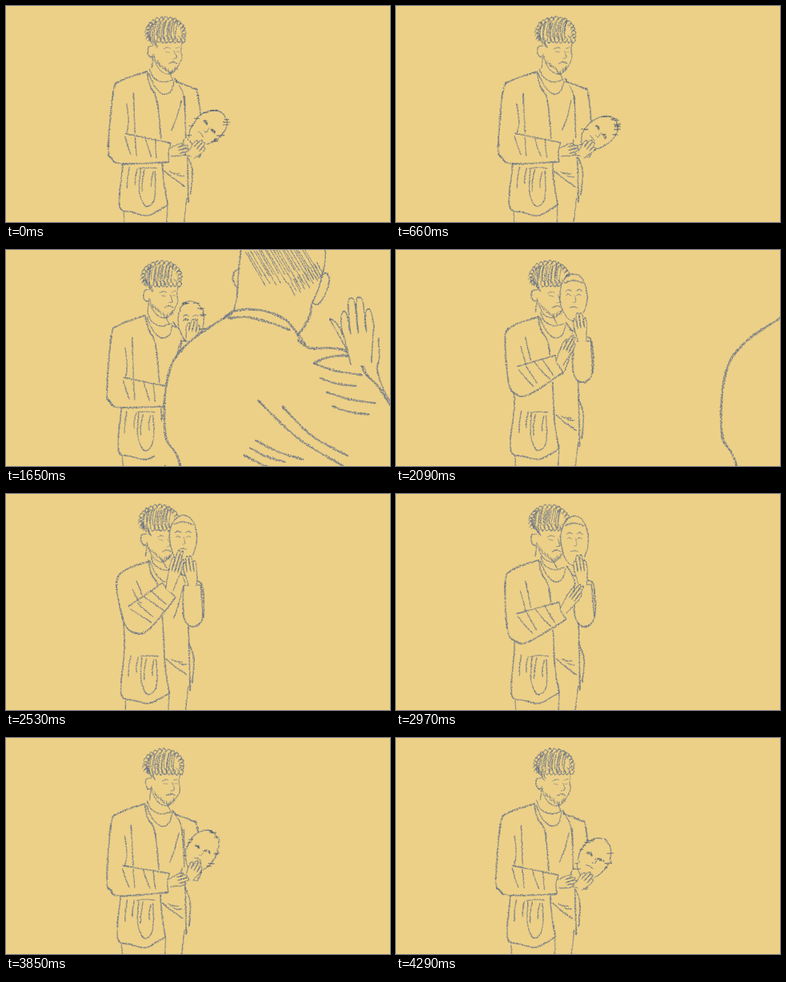
Recreate the animation shown at these times as an HTML page with a canvas. Size 480 px wide and 270 px high, loop 4.4 s.

```html
<!DOCTYPE html>
<html lang="en">
<head>
<meta charset="utf-8">
<title>Pencil sketch loop</title>
<style>
html, body { margin: 0; width: 100%; height: 100%; overflow: hidden; background: #ecd088; }
canvas { display: block; width: 100vw; height: 100vh; }
</style>
</head>
<body>
<canvas id="c" width="480" height="270"></canvas>
<script>
const ctx = document.getElementById('c').getContext('2d');
const PAPER = '#ecd088', PENCIL = '#66728a', INK = '#3c4f74';
const STEP = 110, COUNT = 40;

// Arm poses: shoulder, elbow, wrist, fingertip
const leftLow = [152, 108, 147, 178, 205, 183, 228, 177];
const leftPray = [156, 110, 166, 155, 204, 120, 219, 70];
const leftMid = [153, 108, 150, 179, 213, 172, 246, 158];
const rightLow = [228, 112, 234, 168, 231, 187, 247, 169];
const rightUp = [226, 112, 232, 150, 232, 114, 238, 87];
const rightPray = [234, 118, 234, 154, 233, 114, 228, 77];
const rightChin = [238, 118, 238, 153, 234, 114, 229, 74];

// Tracks: [frame, values...], eased between entries
const leftTrack = [[0, ...leftLow], [16, ...leftLow], [21, ...leftPray], [25, ...leftPray],
  [29, ...leftMid], [32, ...leftMid], [36, ...leftLow]];
const rightTrack = [[0, ...rightLow], [11, ...rightLow], [15, ...rightUp], [20, ...rightPray],
  [25, ...rightPray], [29, ...rightChin], [32, ...rightChin], [36, ...rightLow]];
// Mask: centre, radii, tilt, glitch
const maskTrack = [[0, 252, 153, 18, 27, .85, 1], [6, 254, 159, 17, 26, .9, 1], [10, 246, 155, 18, 22, .5, 1],
  [15, 233, 90, 16, 26, 0, .6], [20, 221, 56, 17, 30, 0, 0], [31, 224, 60, 17, 32, 0, 0], [36, 250, 151, 19, 27, .5, 1]];
// Offsets: whole man, torso, head
const shiftTrack = [[0, 0, 0, 0], [6, 0, 0, 0], [10, -3, 0, -1], [15, -2, 0, -3],
  [20, 0, 2, -8], [26, 0, 2, -8], [31, 0, 1, -7], [36, -3, 0, 1]];

let seed = 1, slice = () => 0;
function rnd() {
  seed = seed + 0x6D2B79F5 | 0;
  let t = Math.imul(seed ^ seed >>> 15, 1 | seed);
  t = t + Math.imul(t ^ t >>> 7, 61 | t) ^ t;
  return ((t ^ t >>> 14) >>> 0) / 4294967296;
}
const lerp = (a, b, u) => a + (b - a) * u;

function values(keys, k) {
  let i = 0;
  while (i < keys.length - 2 && keys[i + 1][0] <= k) i++;
  const a = keys[i], b = keys[i + 1];
  const u = Math.min(1, (k - a[0]) / (b[0] - a[0])), e = u * u * (3 - 2 * u);
  return a.slice(1).map((v, j) => lerp(v, b[j + 1], e));
}

// Catmull-Rom samples about `gap` pixels apart
function curve(p, gap) {
  const out = [], n = p.length / 2;
  const at = (i, d) => p[Math.max(0, Math.min(n - 1, i)) * 2 + d];
  const spline = (i, d, t) => {
    const a = at(i - 1, d), b = at(i, d), c = at(i + 1, d), e = at(i + 2, d);
    return b + t / 2 * (c - a + t * (2 * a - 5 * b + 4 * c - e + t * (3 * (b - c) + e - a)));
  };
  for (let i = 0; i < n - 1; i++) {
    const m = Math.ceil(Math.hypot(at(i + 1, 0) - at(i, 0), at(i + 1, 1) - at(i, 1)) / gap) || 1;
    for (let j = 0; j < m; j++) out.push([spline(i, 0, j / m), spline(i, 1, j / m)]);
  }
  return out;
}

// Grainy pencil line with tapered ends and uneven pressure
function stroke(p, w = 2, color = PENCIL) {
  const pts = curve(p.map(v => v + (rnd() - .5) * .8), .6 / w);
  const phase = rnd() * 6, taper = 9 * w;
  ctx.fillStyle = color;
  pts.forEach(([x, y], i) => {
    const end = Math.min(1, .35 + Math.min(i, pts.length - i) / taper);
    const press = end * (.85 + .15 * Math.sin(i * .1 / w + phase));
    const size = .65 + rnd() * .5;
    ctx.globalAlpha = press * (.35 + rnd() * .6);
    ctx.fillRect(x + slice(y) + (rnd() - .5) * w * press - size / 2,
      y + (rnd() - .5) * w * press - size / 2, size, size);
  });
  ctx.globalAlpha = 1;
}

// Strokes as "x y x y ..." parted by slashes
const sketch = (w, s) => s.split('/').forEach(p => stroke(p.trim().split(/\s+/).map(Number), w));

function blank(p) {
  ctx.beginPath();
  curve(p.concat(p.slice(0, 2)), 2).forEach(q => ctx.lineTo(q[0], q[1]));
  ctx.fillStyle = PAPER;
  ctx.fill();
}

// n lines starting along one segment, all running (dx, dy) with a bend
function lines(x0, y0, x1, y1, n, dx, dy, w, bend = 1, rough = 2) {
  for (let i = 0; i < n; i++) {
    const u = n > 1 ? i / (n - 1) : 0, l = 1 - .25 * (i % 2) - rnd() * .03 * rough;
    const x = lerp(x0, x1, u) + rnd() * rough, y = lerp(y0, y1, u) + rnd() * rough;
    stroke([x, y, x + dx * l / 2 - bend, y + dy * l / 2 + bend, x + dx * l, y + dy * l], w);
  }
}
function shifted(dx, fn) {
  ctx.save();
  ctx.translate(dx, 0);
  fn();
  ctx.restore();
}

// Sleeve built from its joints; side is 1 for the screen-left arm, -1 for the other
function sleeve([sx, sy, ex, ey, wx, wy], [r0, r1, r2], side) {
  const normal = (dx, dy) => {
    const l = Math.hypot(dx, dy) || 1;
    return [-dy / l * side, dx / l * side];
  };
  const off = (x, y, n, r) => [x + n[0] * r, y + n[1] * r];
  const n1 = normal(ex - sx, ey - sy), n2 = normal(wx - ex, wy - ey);
  const sum = [n1[0] + n2[0], n1[1] + n2[1]], len = Math.hypot(...sum);
  const mid = len > .4 ? sum.map(v => v / len) : [0, 1];
  const top = [...off(sx, sy, [side * 1.35, -1.45], r0), ...off(sx, sy, [-.45 * side, -.8], r0),
    ...off(sx, sy, n1, r0), ...off(ex, ey, n1, r1)];
  const seam = [...off(ex, ey, n1, -.8 * r1), ...off(sx, sy, n1, -.4 * r0)];
  const under = [...off(ex, ey, mid, r1), ...off(ex, ey, n2, r1), ...off(wx, wy, n2, r2)];
  const inner = [...off(wx, wy, n2, -r2), ...off(ex, ey, n2, -r1)];
  blank(top.concat(seam));
  stroke(seam, 1.7);
  blank(top.slice(6).concat(under, inner));
  stroke(top.concat(under), 2.3);
  stroke(inner, 1.9);
  stroke([...off(wx, wy, n2, -r2), wx - 2, wy, ...off(wx, wy, n2, r2)], 1.5);
  if (side < 0) return;
  for (let i = 0; i < 4; i++) {
    const x = lerp(ex, wx, i * .22), y = lerp(ey, wy, i * .22), lean = 5 - 3 * (i % 2);
    stroke([...off(x, y, n2, -r1 * .8), ...off(x + lean, y, n2, -2), ...off(x + lean * 2, y, n2, r1 * .45)], 1.6);
  }
  const x = lerp(sx, ex, .2), y = lerp(sy, ey, .2);
  stroke([x, y, lerp(x, ex, .4) + 4, lerp(y, ey, .4), ex + 4, ey - r1], 1.5);
}

// Hand with four fingers from wrist to fingertip; thumb is a side or 0
function hand(wx, wy, tx, ty, w, thumb, weight) {
  const dx = tx - wx, dy = ty - wy, l = Math.hypot(dx, dy);
  const at = list => list.flatMap(([a, b]) => [wx + dx * a - dy / l * b * w, wy + dy * a + dx / l * b * w]);
  const edge = s => at([[0, .75 * s], [.25, .95 * s], [.5, 1.15 * s]]);
  const tip = thumb && at([[.22, .95 * thumb], [.5, 1.55 * thumb], [.7, 1.95 * thumb], [.62, 1.5 * thumb], [.45, 1.1 * thumb]]);
  if (tip) blank(tip);
  blank(at([[0, -.7], [.45, -1.1], [.95, -.85], [1, 0], [.95, .85], [.45, 1.1], [0, .7]]));
  if (tip) stroke(tip, weight);
  for (const s of [-1, 1]) stroke(edge(s), weight);
  for (let i = 0; i < 4; i++) {
    const b = (i - 1.5) * .6, end = 1 - .09 * (i - 1.5) ** 2;
    stroke(at([[.45, b - .28], [end - .08, b - .24], [end, b], [end - .08, b + .24], [.5, b + .28]]), weight);
  }
}

function drawTorso() {
  sketch(2, `176 82 180 100 189 118 194 168 197 215 202 249 / 211 90 222 112 226 165 228 246
    / 145 160 146 195 142 236 144 254 158 258 176 262 190 256 203 248
    / 226 186 233 206 231 236 / 198 206 210 216 224 226`);
  sketch(1.5, `179 78 184 89 196 95 209 92 / 178 84 186 101 197 110 206 106 210 93
    / 219 118 214 138 207 156 / 147 258 148 272 / 202 250 201 272 / 226 240 222 272
    / 168 204 167 232 174 250 184 245 187 228 186 206 / 166 203 177 202 189 203`);
  lines(153, 200, 182, 206, 4, -3, 28, 1.7);
  lines(204, 206, 212, 210, 2, 14, 3, 1.8);
}

function drawHead() {
  sketch(1.6, '184 50 178 51 177 59 181 64 185 60 / 184 63 182 78 / 205 85 209 93');
  sketch(1.1, `220 44 219 55 220 64 217 72 212 79 204 85 194 81 187 71 185 62
    / 210 56 213 64 208 66 / 197 54 202 52 206 53 / 212 53 218 51 / 199 57 205 58 / 213 57 217 57`);
  stroke([203, 72, 209, 70, 214, 72], 1.9);
  for (let i = 0; i < 16; i++) {
    const a = 2.75 + i * .25, x = 199 + Math.cos(a) * 23, y = 33 + Math.sin(a) * 18;
    stroke([x - 3, y + 2, x, y - 2, x + 3, y + 1, x - 1, y + 4], 1.6);
  }
  lines(182, 19, 213, 18, 15, -3, 24, 1.4);
  lines(176, 32, 186, 42, 6, 4, 12, 1.5);
  for (let x = 190; x < 222; x += 5) stroke([x, 37, x + 4, 42, x + 1, 46, x - 2, 42], 1.5);
  lines(187, 66, 203, 80, 10, 3, 5, 1.1);
  lines(204, 80, 213, 74, 7, 1, 5, 1.2);
}

function drawMask([cx, cy, rx, ry, rot, glitch]) {
  const c = Math.cos(rot), s = Math.sin(rot);
  const at = list => list.flatMap(([x, y]) => [cx + x * rx * c - y * ry * s, cy + x * rx * s + y * ry * c]);
  const rim = at(Array.from({ length: 15 }, (_, i) => {
    const a = i / 7 * Math.PI + 2, y = Math.sin(a);
    return [Math.cos(a) * (1 - .1 * y), y];
  }));
  blank(rim);
  const rows = Array.from({ length: 91 }, () => rnd() < .2 ? (rnd() - .5) * 5 * glitch : 0);
  slice = y => rows[Math.max(0, Math.min(90, Math.floor(y / 3)))];
  stroke(rim, 1.5);
  for (const m of [-1, 1]) {
    stroke(at([[.2 * m, -.08], [.4 * m, -.14], [.58 * m, -.08]]), 1.2 + 3 * glitch, glitch > .2 ? INK : PENCIL);
    if (glitch < .7) stroke(at([[.15 * m, -.28], [.4 * m, -.34], [.62 * m, -.26]]), 1.5);
  }
  stroke(at([[.06, -.1], [.14, .16], [-.08, .2]]), 1);
  stroke(at([[-.28, .42], [0, .38], [.28, .43]]), 1.4);
  if (glitch < .2) stroke(at([[-.7, -.62], [0, -.72], [.72, -.6]]), 2);
  slice = () => 0;
  for (let i = 0; i < 14 * glitch; i++) {
    const a = rnd() * 6.28, [x, y] = at([[Math.cos(a), Math.sin(a)]]), l = 2 + rnd() * 3;
    stroke([x - l, y, x + l, y], 1.8, INK);
  }
}

function drawMan(k) {
  const left = values(leftTrack, k), right = values(rightTrack, k);
  const [all, torso, head] = values(shiftTrack, k);
  shifted(all, () => {
    shifted(torso, drawTorso);
    sleeve(right, [12, 12, 11], -1);
    shifted(head, drawHead);
    drawMask(values(maskTrack, k));
    hand(...right.slice(4), 7, 0, 1.3);
    sleeve(left, [18, 19, 12], 1);
    hand(...left.slice(4), 6.5, 0, 1.4);
  });
}

function drawSide() {
  blank([88, -8, 99, 24, 88, 42, 80, 55, 66, 100, 28, 122, 45, 165, 72, 215, 90, 272,
    -115, 272, -90, 150, -22, 118, -32, 60, -20, -10]);
  sketch(1.9, `74 23 82 19 97 18 99 30 95 38 86 39 80 34 78 23 / 47 15 62 18 78 22
    / 48 22 39 18 29 27 27 42 33 55 42 62 48 57 / 42 27 35 32 34 42 40 50
    / 87 -4 90 8 89 17 / 87 40 91 46 86 52 80 55 75 73 66 100 54 108 28 122 / -32 60 -30 92 -20 118`);
  sketch(2.4, `-90 150 -50 128 0 120 28 131 46 166 71 214 76 236
    / 53 176 62 183 70 202 76 226 / 0 165 40 200 60 222 75 250 90 270`);
  lines(-24, 22, 34, -6, 13, 12, -17, 1.7);
  lines(43, 84, 62, 72, 8, -4, 26, 1.5);
  lines(-22, 186, 4, 262, 5, 54, -2, 2.2, 5);
  blank([122, 274, 149, 215, 158, 160, 196, 160, 196, 215, 192, 274]);
  sketch(2, '120 272 136 248 149 215 156 182 157 155 / 192 272 192 242 196 215 204 180 206 150');
  hand(180, 168, 189, 49, 22, 1, 1.8);
  lines(177, 62, 194, 72, 5, 1, 38, 1.7);
}

function drawBack() {
  blank([294, -8, 284, 32, 289, 60, 283, 78, 235, 110, 205, 150, 198, 200, 216, 274,
    560, 274, 510, 232, 450, 152, 410, 123, 366, 112, 383, 68, 402, 42, 399, -8]);
  blank([420, 124, 424, 150, 450, 170, 484, 200, 468, 130]);
  sketch(2, `294 -4 291 25 289 58 285 76 / 293 23 286 27 284 38 289 48
    / 399 -4 398 20 391 46 382 68 / 390 36 400 29 404 38 399 55 391 67 383 66
    / 466 110 467 135 464 150 473 176 484 196`);
  sketch(3.2, `382 68 378 86 364 108 / 272 86 283 77 306 74 331 78 350 88 361 101 374 119
    / 278 85 302 84 330 91 355 100 / 283 79 260 93 235 110 215 130 205 150 200 175 198 202 200 235 212 254 218 271
    / 364 112 380 122 410 123 428 128 442 138 450 155 466 172 484 200 512 234 550 271
    / 384 142 402 134 428 133 446 146`);
  lines(384, 142, 408, 195, 4, 62, 14, 2.8, 2, 0);
  lines(315, 188, 345, 195, 2, 110, 84, 2.8, 5, 0);
  lines(312, 238, 297, 256, 3, 60, 24, 2.8, 2, 0);
  hand(444, 142, 436, 58, 17, -1, 1.7);
  lines(298, 2, 368, -10, 22, 26, 44, 1.1, 0);
  lines(352, 40, 388, 14, 14, 10, 18, 1.3, 0);
}

function draw(k) {
  seed = k * 7919 + 17;
  ctx.fillStyle = PAPER;
  ctx.fillRect(0, 0, 480, 270);
  drawMan(k);
  if (k > 6 && k < 13) shifted((k - 10) * 59, drawSide);
  else if (k > 12 && k < 21) shifted((k - 15) * (k < 15 ? 59 : 52), drawBack);
}

let last = -1;
function tick() {
  const k = Math.floor(performance.now() / STEP) % COUNT;
  if (k !== last) draw(last = k);
  requestAnimationFrame(tick);
}
tick();
</script>
</body>
</html>
```
